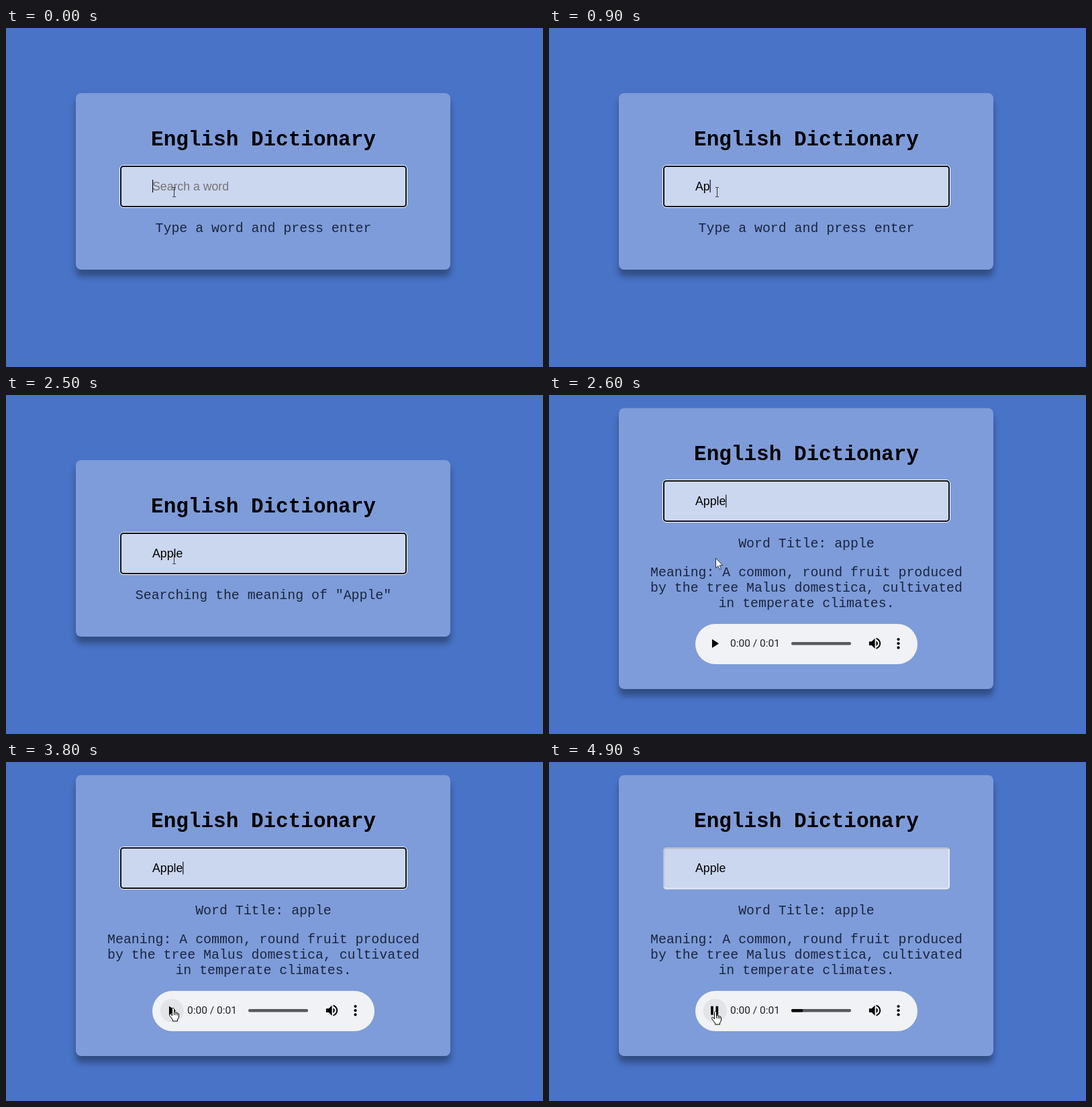
An HTML page that plays this animation: 800 px wide and 505 px high, repeating every 5 s.

```html
<!DOCTYPE html>
<html lang="en">
<head>
<meta charset="utf-8">
<title>English Dictionary</title>
<style>
  html, body { margin: 0; width: 100%; height: 100%; overflow: hidden; background: #4873c6; }
  svg { display: block; width: 100%; height: 100%; }
  text { font-kerning: none; white-space: pre; }
  .mono { font: 19.87px "Liberation Mono", "Courier New", monospace; text-anchor: middle; fill: #1a2540; }
  .title { font-size: 31px; font-weight: bold; fill: #000; }
  .field { font: 17.7px "Liberation Sans", Arial, sans-serif; }
  .time { font: 15.5px Roboto, Arial, sans-serif; fill: #202124; }
</style>
</head>
<body>
<svg viewBox="0 0 800 505">
  <defs>
    <filter id="blur" x="-10%" y="-20%" width="120%" height="140%">
      <feGaussianBlur stdDeviation="5"/>
    </filter>
  </defs>
  <rect width="800" height="505" fill="#4873c6"/>
  <rect id="shadow" x="104" width="558" rx="8" fill="#000" opacity=".33" filter="url(#blur)"/>
  <rect id="card" x="104" width="558" rx="8" fill="#7e9cd9"/>

  <g id="head">
    <text class="mono title" x="383.5" y="174.5">English Dictionary</text>
    <rect x="170" y="205" width="427" height="62" rx="5" fill="#cbd6ef"/>
    <g id="ring" fill="none">
      <rect x="169.5" y="204.5" width="428" height="63" rx="5.5" stroke="#fff"/>
      <rect x="171" y="206" width="425" height="60" rx="4" stroke="#0b0d14" stroke-width="2"/>
    </g>
    <g id="bevel" fill="none" stroke-width="2">
      <path d="M595 207Q596 208 596 210V262Q596 266 592 266H175Q172 266 171.500 264" stroke="#e4e9f5"/>
      <path d="M171.500 264Q171 263 171 262V210Q171 206 175 206H592Q594 206 595 207" stroke="#b9bfd0"/>
    </g>
    <text id="typed" class="field" x="218" y="241.5"></text>
    <rect id="caret" y="226" width="1.1" height="19" fill="#000"/>
    <text id="info" class="mono" x="383.5" y="304"></text>
  </g>

  <g id="result">
    <text class="mono" x="383.5" y="270">Meaning: A common, round fruit produced</text>
    <text class="mono" x="383.5" y="292.8">by the tree Malus domestica, cultivated</text>
    <text class="mono" x="383.5" y="315.6">in temperate climates.</text>
    <rect x="218" y="341" width="331" height="60" rx="30" fill="#f0f2f5"/>
    <circle id="hover" cx="247.3" cy="370.3" r="17.6" fill="#e2e4e7"/>
    <g transform="translate(235.6 359.2) scale(.92)">
      <path id="play" d="M8 5v14l11-7z"/>
      <path id="pause" d="M6 19h4V5H6zM14 5v14h4V5z"/>
    </g>
    <text class="time" x="270" y="375.4">0:00 / 0:01</text>
    <rect x="361" y="368" width="89" height="4.5" rx="2" fill="#585b5b"/>
    <rect id="bar" x="361" y="368" height="4.5" rx="2" fill="#0c0c0c"/>
    <path transform="translate(474 358.6) scale(.96)" d="M3 9v6h4l5 5V4L7 9zM16.5 12c0-1.8-1-3.3-2.5-4v8c1.5-.7 2.5-2.2 2.5-4zM14 3.2v2.1c2.9.9 5 3.5 5 6.7s-2.1 5.8-5 6.7v2.1c4-.9 7-4.5 7-8.8s-3-7.9-7-8.8z"/>
    <circle cx="520.5" cy="364" r="2.1"/>
    <circle cx="520.5" cy="370.2" r="2.1"/>
    <circle cx="520.5" cy="376.4" r="2.1"/>
  </g>

  <g id="pointer">
    <path id="beam" d="M-2.5-6.5h2l.5.5.5-.5h2M0-6V7M-2.5 7.5h2l.5-.5.5.5h2" fill="none" stroke="#30343e"/>
    <path id="arrow" d="M0 0V14.8L3.4 11.6 5.6 16.8 7.8 15.8 5.6 10.8H10.3z" fill="#fff" stroke="#1b2030" stroke-width=".9"/>
    <path id="hand" transform="translate(-6 -.5)" d="M4.5 2c0-2 3-2 3 0v5c.5-1 2.5-.8 2.5.6.5-.9 2.4-.5 2.4.9.6-.6 2.1-.2 2.1 1.2V14l-2 4v2h-7v-2L2 13.5.6 11.2c-.8-1.6 1-2.6 2.3-1.2l1.6 1.8zM7.5 7v4M10 7.6V11M12.4 8.5V11.5" fill="#fff" stroke="#000"/>
  </g>
</svg>
<script>
  const LOOP = 5000, STEP = 100;
  const WORD = "Apple";
  const KEYS = [600, 850, 1100, 1350, 1600];
  const ENTER = 2300, FOUND = 2600, BLUR = 4600, PLAY = 4700, TICK = 4900;
  // time, x, y of the pointer after the result appears
  const PATH = [[3000, 248.5, 243], [3600, 249, 352], [3800, 249, 366.5], [4100, 248, 371.5]];

  const $ = id => document.getElementById(id);
  const set = (id, attrs) => {
    for (const k in attrs) $(id).setAttribute(k, attrs[k]);
  };
  const show = (id, on) => set(id, { visibility: on ? "visible" : "hidden" });

  function pointerAt(t) {
    if (t < FOUND) return [250.5, 244];
    if (t <= PATH[0][0]) return PATH[0].slice(1);
    for (let i = 1; i < PATH.length; i++) {
      const [t0, x0, y0] = PATH[i - 1], [t1, x1, y1] = PATH[i];
      if (t <= t1) {
        const u = (t - t0) / (t1 - t0);
        return [x0 + (x1 - x0) * u, y0 + (y1 - y0) * u];
      }
    }
    return PATH[PATH.length - 1].slice(1);
  }

  function draw(t) {
    const found = t >= FOUND, focused = t < BLUR, playing = t >= PLAY;
    const top = found ? 19.5 : 97, height = found ? 418.5 : 263;
    set("card", { y: top, height });
    set("shadow", { y: top + 10, height });
    set("head", { transform: `translate(0 ${found ? -77.5 : 0})` });
    // the frame of the field snaps to whole pixels
    set("ring", { transform: `translate(0 ${found ? -0.5 : 0})` });

    const count = KEYS.filter(k => t >= k).length;
    const typed = $("typed");
    typed.textContent = count ? WORD.slice(0, count) : "Search a word";
    set("typed", { fill: count ? "#000" : "#757575" });
    const lastKey = count ? KEYS[count - 1] : 0;
    set("caret", { x: 218 + (count ? typed.getComputedTextLength() : 0) });
    show("caret", focused && (t - lastKey) % 1000 < 500);
    show("ring", focused);
    show("bevel", !focused);

    $("info").textContent = found ? "Word Title: apple"
      : t >= ENTER ? `Searching the meaning of "${WORD}"`
      : "Type a word and press enter";

    const [x, y] = pointerAt(t);
    const over = found && y > 353;
    set("pointer", { transform: `translate(${x} ${y})` });
    show("beam", !found);
    show("arrow", found && !over);
    show("hand", over);

    set("result", { display: found ? "inline" : "none" });
    set("hover", { display: over ? "inline" : "none" });
    set("play", { display: playing ? "none" : "inline" });
    set("pause", { display: playing ? "inline" : "none" });
    set("bar", { width: t >= TICK ? 17.5 : 0 });
  }

  const start = performance.now();
  function frame() {
    const t = (performance.now() - start) % LOOP;
    draw(Math.floor(t / STEP) * STEP);
    requestAnimationFrame(frame);
  }
  frame();
</script>
</body>
</html>
```
